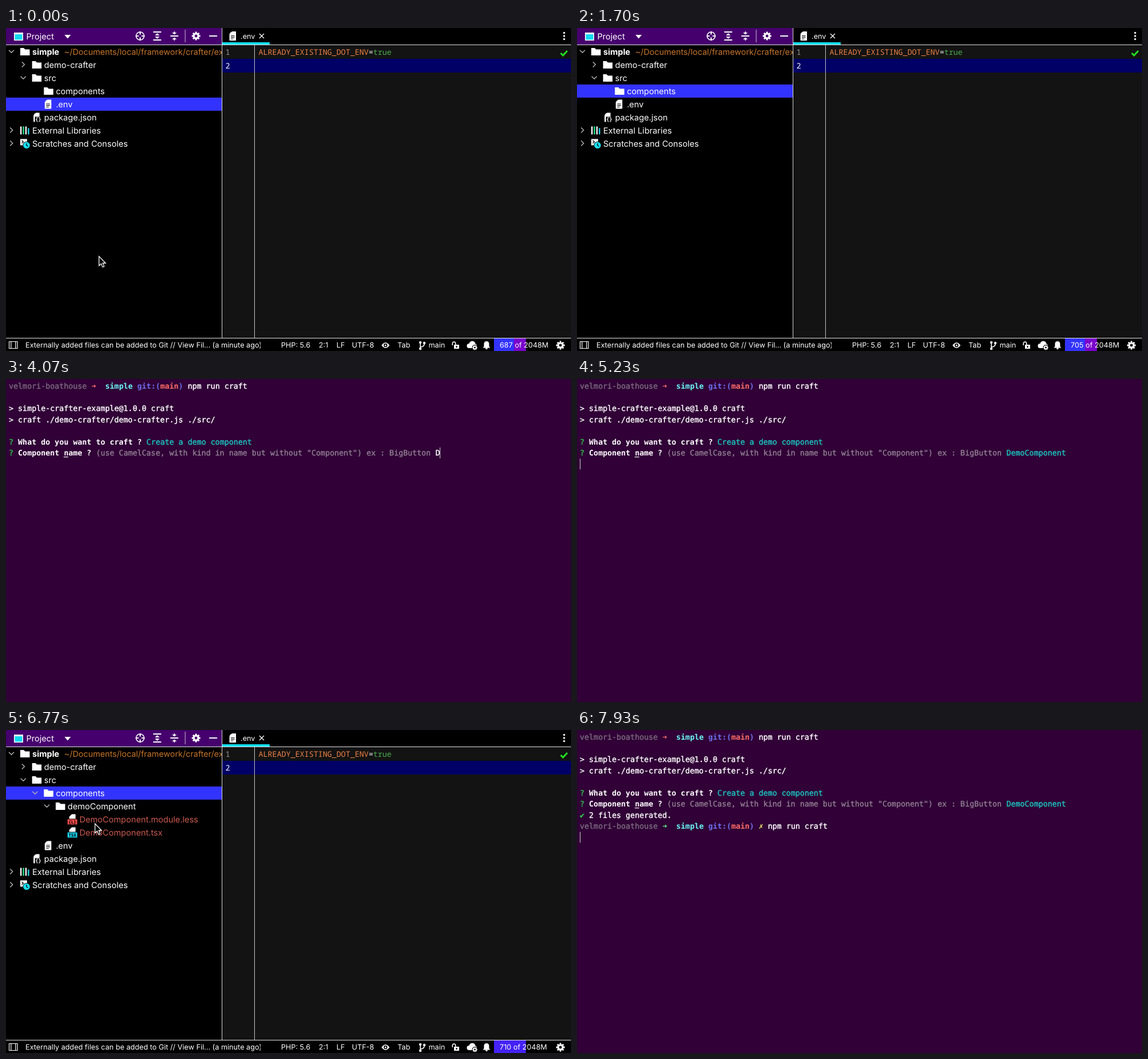
These frames come from a looping animation (990 px wide and 566 px high, 8000 ms). An HTML page with a canvas:

```html
<!DOCTYPE html>
<html lang="en">
<head>
<meta charset="utf-8">
<title>Component crafting demo</title>
<style>
html, body { margin: 0; width: 100%; height: 100%; overflow: hidden; background: #000; }
canvas { display: block; }
</style>
</head>
<body>
<canvas id="stage" width="990" height="566"></canvas>
<script>
const ctx = document.getElementById('stage').getContext('2d');
const LOOP = 8000;
const UI = 'Inter, "Open Sans", sans-serif';
const MONO = '"DejaVu Sans Mono", monospace';
const CODE = '"Noto Sans Mono", "DejaVu Sans Mono", monospace';
ctx.textRendering = 'geometricPrecision';

// ---- drawing helpers ----
function rect(x, y, w, h, color) {
  ctx.fillStyle = color;
  ctx.fillRect(x, y, w, h);
}
function text(str, x, y, font, color = '#fff', weight = 0) {
  ctx.font = font;
  ctx.fillStyle = ctx.strokeStyle = color;
  ctx.fillText(str, x, y);
  if (!weight) return;
  ctx.lineWidth = weight;
  ctx.strokeText(str, x, y);
}
function line(d, color = '#fff', width = 1.6) {
  ctx.strokeStyle = color;
  ctx.lineWidth = width;
  ctx.stroke(new Path2D(d));
}
function shape(d, color = '#fff') {
  ctx.fillStyle = color;
  ctx.fill(new Path2D(d));
}
function dot(x, y, r, color = '#fff') {
  ctx.fillStyle = color;
  ctx.beginPath();
  ctx.arc(x, y, r, 0, 7);
  ctx.fill();
}
function at(x, y, draw) {
  ctx.save();
  ctx.translate(x, y);
  draw();
  ctx.restore();
}

// ---- icons, each around its own origin ----
function gear(x, y, r, hole) {
  at(x, y, () => {
    for (let i = 0; i < 4; i++) {
      rect(-r * .2, -r, r * .4, r * 2, '#fff');
      ctx.rotate(Math.PI / 4);
    }
    dot(0, 0, r * .74);
    dot(0, 0, r * .32, hole);
  });
}
function chevron(x, y, open) {
  at(x, y, () => line(open ? 'M-4.5-2.3L0 2.2L4.5-2.3' : 'M-2.3-4.5L2.2 0L-2.3 4.5', '#b4b4b4', 1.4));
}
const icons = {
  folder() { shape('M0-6.5H6L8.5-4H16.5V6.5H0Z'); },
  page() {
    shape('M6.5-8H13V8H1.5V-3Z');
    shape('M5.5-8V-4H1.5Z');
    line('M4-.5H10.5M4 2.2H10.5M4 5H8.5', '#000', 1.2);
  },
  json() {
    shape('M7-8H13V8H2.5V-3Z');
    shape('M6-8V-4H2.5Z');
    rect(5, -1, 11, 10, '#000');
    text('{}', 5.5, 6.5, 'bold 9px ' + MONO);
  },
  libs() {
    ['#fff', '#21e08a', '#fff', '#21d4e8'].forEach((c, i) =>
      rect(i * 4.4, i == 3 ? -4 : -7, 2.4, i == 3 ? 11 : 14, c));
  },
  scratch() {
    rect(0, -8, 12, 11, '#fff');
    line('M2.5-5.5L5.5-3L2.5-.5M6.5 .5H10', '#000', 1.3);
    dot(11, 3, 6.6, '#000');
    dot(11, 3, 5.8, '#19dff2');
    line('M11-.5V3.2L13.5 5', '#000', 1.3);
  },
  less() { badge('{L}', '#f04848'); },
  tsx() { badge('TSX', '#19cfe8'); }
};
function badge(label, color) {
  shape('M7.5-9H14V-1H3V-4.5Z');
  rect(0, 0, 17, 9, color);
  text(label, 1.7, 7.2, 'bold 7.5px ' + MONO, '#000');
}

function header() {
  const bg = '#46006e';
  rect(0, 0, 378, 29, bg);
  rect(14, 8, 16, 14, '#fff');
  rect(15.5, 11, 13, 9.5, '#12d8f2');
  text('Project', 35.5, 19.5, '14.6px ' + UI);
  shape('M102.5 12H113.5L108 18.5Z');
  at(235, 14, () => {
    ctx.beginPath();
    ctx.arc(0, 0, 7, 0, 7);
    ctx.strokeStyle = '#fff';
    ctx.lineWidth = 1.6;
    ctx.stroke();
    line('M-8 0H-2.5M2.5 0H8M0-8V-2.5M0 2.5V8', '#fff', 2);
  });
  at(265, 14, () => {
    line('M-7-7H7M-7 7H7', '#fff', 2);
    shape('M0-5L4-1H-4ZM0 5L4 1H-4Z');
  });
  at(295, 14, () => {
    line('M-7 0H7', '#fff', 2);
    shape('M0-2.5L4-6H-4ZM0 2.5L4 6H-4Z');
    line('M0-8V-5M0 5V8');
  });
  rect(313.5, 3, 1, 22, '#d0c0da');
  gear(333, 14, 7.5, bg);
  rect(356, 13, 14, 2, '#fff');
}

function editor() {
  rect(379, 0, 611, 29, '#000');
  at(390, 14, icons.page);
  text('.env', 411, 18.5, '12.7px ' + UI);
  line('M444 10L452 18M452 10L444 18', '#fff', 1.3);
  rect(379, 25, 83, 4, '#10e0f0');
  [8.5, 14, 19.5].forEach(y => dot(978, y, 1.7));
  rect(379, 30, 611, 513, '#131313');
  rect(379, 54, 611, 24, '#000066');
  rect(435, 30, 1, 513, '#c4c4c4');
  const font = '13.4px ' + CODE;
  text('1', 384.5, 47, font, '#9a9a9a');
  text('2', 384.5, 71, font);
  text('ALREADY_EXISTING_DOT_ENV', 442.5, 47, font, '#ee8144');
  text('=', 635.5, 47, font);
  text('true', 643.5, 47, font, '#4cae50');
  line('M972 44L976 48L983.5 40', '#22dd22', 3);
}

function statusBar(t) {
  rect(0, 544, 990, 22, '#000');
  line('M5.5 549.5H20V561.5H5.5ZM8.8 549.5V561.5M16.8 549.5V561.5', '#fff', 1.2);
  const font = '12.7px ' + UI;
  const say = (s, x) => text(s, x, 560.3, font);
  ctx.save();
  ctx.beginPath();
  ctx.rect(0, 544, 446, 22);
  ctx.clip();
  say('Externally added files can be added to Git // View Fil... (a minute ago)', 34);
  ctx.restore();
  say('PHP: 5.6', 482);
  say('2:1', 548);
  say('LF', 579);
  say('UTF-8', 606);
  at(665, 556, () => {
    shape('M-7 0Q0-9.5 7 0Q0 9.5-7 0Z');
    dot(0, 0, 3.2, '#000');
    dot(0, 0, 1.6);
  });
  say('Tab', 686);
  at(729, 556, () => {
    line('M-3-5V6M-3 3Q4 3 4-3');
    dot(-3, -5, 2.2);
    dot(-3, 6, 2.2);
    dot(4, -4, 2.2);
  });
  say('main', 740.5);
  at(787, 556, () => {
    rect(-2, -1, 9, 7, '#fff');
    rect(1.5, 1, 2, 3, '#000');
    line('M-4.7 0V-3Q-4.7-6-2-6Q.7-6 .7-3V-1');
  });
  at(816, 556, () => {
    dot(-4.5, 1, 4);
    dot(1, -2, 5.5);
    dot(5.5, 1, 3.5);
    rect(-4.5, 0, 10, 5, '#fff');
    dot(5.5, 4, 5, '#000');
  });
  gear(821.5, 560, 4.3, '#000');
  at(842, 556, () => {
    shape('M-6.5 4.5L-4.5 2V-2Q-4.5-7 0-7Q4.5-7 4.5-2V2L6.5 4.5Z');
    dot(0, 5.5, 1.8);
  });
  const late = t > 5000;
  rect(855, 544, 56, 22, late ? '#4422f4' : '#3333ff');
  if (!late) rect(890, 544, 21, 22, '#7a00cc');
  const used = late ? 710 : t < 400 ? 687 : t < 1000 ? 697 : 705;
  say(used + ' of 2048M', 865);
  gear(971.5, 556, 7.5, '#000');
}

function tree(t) {
  const open = t >= 6200;
  const fresh = t > 5000;
  // name, level, icon, chevron (0 none, 1 closed, 2 open), colour
  const rows = [
    ['simple', 0, 'folder', 2],
    ['demo-crafter', 1, 'folder', 1],
    ['src', 1, 'folder', 2],
    ['components', 2, 'folder', open ? 2 : fresh ? 1 : 0],
    ...(open ? [
      ['demoComponent', 3, 'folder', 2],
      ['DemoComponent.module.less', 4, 'less', 0, '#cc5a50'],
      ['DemoComponent.tsx', 4, 'tsx', 0, '#cc5a50']
    ] : []),
    ['.env', 2, 'page', 0],
    ['package.json', 1, 'json', 0],
    ['External Libraries', 0, 'libs', 1],
    ['Scratches and Consoles', 0, 'scratch', 1]
  ];
  const selected = t < 830 ? '.env' : 'components';
  rect(0, 30, 378, 513, '#000');
  ctx.save();
  ctx.beginPath();
  ctx.rect(0, 30, 378, 513);
  ctx.clip();
  rows.forEach(([name, level, icon, arrow, color], i) => {
    const y = 41.5 + 23 * i, dx = 20.7 * level;
    if (name == selected) rect(0, y - 11.5, 378, 23, '#3333ff');
    if (arrow) chevron(9.5 + dx, y - .5, arrow == 2);
    at(25 + dx, y, icons[icon]);
    text(name, 46 + dx, y + 5.5, (level || i ? '' : 'bold ') + '14.6px ' + UI, color);
  });
  text('~/Documents/local/framework/crafter/examples', 102, 47, '14.4px ' + UI, '#c8762a');
  ctx.restore();
}

// ---- pointer ----
const path = [
  [30, 163, 400], [500, 150, 240], [800, 130, 108], [870, 130, 110], [1330, 101, 134], [1470, 101, 134],
  [1700, 206, 148], [5530, 206, 149], [5870, 156, 142], [6150, 54, 112], [6300, 54, 115], [6400, 54, 115],
  [6770, 156, 164], [7170, 206, 149]
];
function pointer(t) {
  const i = path.findIndex(k => k[0] > t);
  if (i < 1) return path[i ? path.length - 1 : 0].slice(1);
  const [t0, x0, y0] = path[i - 1], [t1, x1, y1] = path[i];
  const p = (t - t0) / (t1 - t0), e = p * p * (3 - 2 * p);
  return [x0 + (x1 - x0) * e, y0 + (y1 - y0) * e];
}
function arrow(t) {
  const d = 'M0 0V16.5L3.7 13L6.3 19L9 17.8L6.5 12H11.5Z';
  at(...pointer(t), () => {
    shape(d, '#000');
    line(d, '#fff', 1.3);
  });
}
function beam() {
  const d = 'M-4-9Q0-9 0-6Q0-9 4-9M-4 9Q0 9 0 6Q0 9 4 9M0-6V6M-2 1H2';
  at(206, 149, () => {
    line(d, '#fff', 3.6);
    line(d, '#201024', 1.2);
  });
}

function ide(t) {
  rect(0, 0, 990, 566, '#000');
  header();
  tree(t);
  editor();
  rect(378, 0, 1, 544, '#d8d8d8');
  rect(0, 29, 990, 1, '#e4e4e4');
  rect(0, 543, 990, 1, '#e4e4e4');
  statusBar(t);
  if (t < 1690 || t > 5000) arrow(t);
}

// ---- terminal ----
const COL = 8.037, ROW = 19.5;
const GREEN = '#2fc44a', TEAL = '#1cc6c0', GREY = '#8f7d91', RED = '#ff6e67';
const keys = [4070, 4115, 4170, 4230, 4370, 4430, 4500, 4570, 4770, 4830, 4970, 5030, 5090];

// Prints [text, colour, bold] runs one after the other
function print(row, ...runs) {
  let col = 0;
  for (const [str, color, bold] of runs) {
    const font = (bold ? 'bold ' : '') + '13.35px ' + MONO;
    text(str, 5 + col * COL, 17 + row * ROW, font, color, bold ? 0 : .4);
    col += str.length;
  }
}
function prompt(row, arrowColor, dirty, cmd) {
  print(row, ['velmori-boathouse ', '#7a6a7d'], ['➜  ', arrowColor, 1], ['simple ', '#6cf6f8', 1],
    ['git:(', '#6c70ee', 1], ['main', RED, 1], [') ', '#6c70ee', 1],
    [dirty ? '✗ ' : '', '#f5f56a', 1], [cmd ? 'npm run craft' : '']);
}
function terminal(t) {
  rect(0, 0, 990, 566, '#300036');
  let caret = [0, t < 2500 ? 39 : 52];
  prompt(0, RED, false, t >= 2500);
  if (t >= 2870) caret = [1, 0];
  if (t >= 3030) {
    print(2, ['> simple-crafter-example@1.0.0 craft']);
    print(3, ['> craft ./demo-crafter/demo-crafter.js ./src/']);
    caret = [5, 0];
  }
  if (t >= 3430) {
    const asked = t < 3670;
    print(5, ['? ', GREEN], ['What do you want to craft ? ', '#fff', 1],
      asked ? ['(Use arrow keys)'] : ['Create a demo component', TEAL]);
    if (asked) {
      print(6, ['❯ Create a demo component', TEAL]);
      print(7, ['  Create a demo page']);
      caret = null;
    }
  }
  if (t >= 3670) {
    const typed = 'DemoComponent'.slice(0, keys.filter(k => k <= t).length);
    print(6, ['? ', GREEN], ['Component name ? ', '#fff', 1],
      ['(use CamelCase, with kind in name but without "Component") ex : BigButton ', GREY],
      [typed, t < 5200 ? '#fff' : TEAL]);
    rect(101, 136, 8, 1.2, '#fff');
    caret = t < 5200 ? [6, 93 + typed.length] : [7, 0];
  }
  if (t >= 5260) {
    print(7, ['✔', GREEN], [' 2 files generated.']);
    caret = [8, 0];
  }
  if (t >= 5330) {
    const cmd = t >= 7650;
    prompt(8, '#5ef884', true, cmd);
    caret = t >= 7870 ? [9, 0] : [8, cmd ? 54 : 41];
  }
  if (caret) rect(Math.floor(5 + caret[1] * COL), 3 + caret[0] * ROW, 1, 19, '#d6ccd8');
  if (t < 2500 || (t >= 7230 && t < 7600)) beam();
}

function frame(now) {
  const t = now % LOOP;
  const inTerminal = (t >= 2070 && t < 5530) || t >= 7230;
  (inTerminal ? terminal : ide)(t);
  requestAnimationFrame(frame);
}
frame(0);
</script>
</body>
</html>
```
